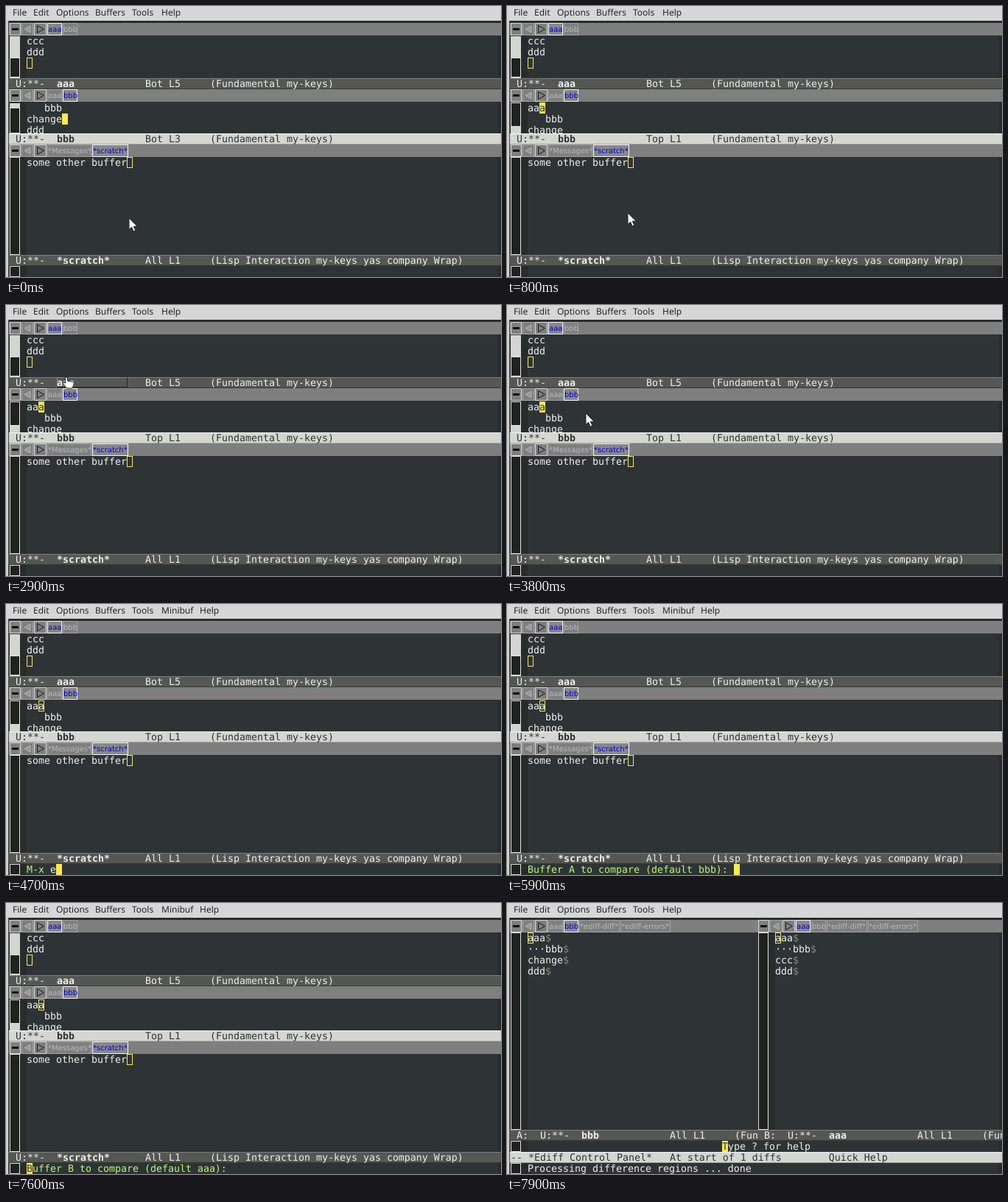
An HTML page that plays this animation: 672 by 368 pixels, repeating every 8000 ms.

```html
<!DOCTYPE html>
<html lang="en">
<head>
<meta charset="utf-8">
<title>Comparing two buffers</title>
<style>
html, body { margin: 0; width: 100%; height: 100%; overflow: hidden; background: #2e3436; }
svg { display: block; width: 672px; height: 368px; }
text { white-space: pre; text-rendering: geometricPrecision; }
.mono { font: 13.29px "DejaVu Sans Mono", monospace; }
.bold { font-weight: bold; }
.menu { font: 12px "Noto Sans", "Open Sans", sans-serif; }
.tab { font: 10px "DejaVu Sans", sans-serif; }
</style>
</head>
<body>
<svg id="stage" viewBox="0 0 672 368"></svg>
<script>
const LOOP = 8000;
const COL = 8, ROW = 15, LEFT = 28;
const BG = '#2e3436', FG = '#eeeeec', YELLOW = '#fce94f', GREEN = '#b4fa70';
const stage = document.getElementById('stage');

const esc = s => s.replace(/&/g, '&amp;').replace(/</g, '&lt;');
const rect = (x, y, w, h, fill, stroke) =>
  stroke
    ? `<rect x="${x + .5}" y="${y + .5}" width="${w - 1}" height="${h - 1}" fill="${fill}" stroke="${stroke}"/>`
    : `<rect x="${x}" y="${y}" width="${w}" height="${h}" fill="${fill}"/>`;
const label = (x, y, s, fill = FG, cls = 'mono') =>
  `<text x="${x}" y="${y}" fill="${fill}" class="${cls}">${esc(s)}</text>`;
const path = (d, fill, stroke = 'none') =>
  `<path d="${d}" fill="${fill}" stroke="${stroke}"/>`;

// Block or hollow text cursor over the given character
function cursor(x, y, filled, char = '') {
  if (!filled) return rect(x, y, COL, ROW, 'none', YELLOW);
  return rect(x, y, COL, ROW, YELLOW) + label(x, y + 12, char, BG);
}

function menuBar(extra) {
  const items = [['File', 9], ['Edit', 37], ['Options', 68], ['Buffers', 121], ['Tools', 171]];
  if (extra) items.push([extra, 211]);
  items.push(['Help', { Minibuf: 263, YASnippet: 279 }[extra] || 211]);
  return rect(0, 0, 672, 20, '#d6d6d6') + rect(0, 20, 672, 3, '#292d2e') +
    items.map(([s, x]) => label(x, 13, s, '#262626', 'menu')).join('');
}

const tabWidths = { aaa: 19, bbb: 19, '*Messages*': 59, '*scratch*': 48, '*ediff-diff*': 54, '*ediff-errors*': 67 };

function tabBar(x, y, names, active) {
  let out = rect(x, y, 672 - x, 17, '#7f7f7f');
  for (const [dx, w] of [[1, 15], [17, 16], [34, 17]])
    out += rect(x + dx, y, w, 17, '#7f7f7f', dx === 17 ? '#a2a2a2' : '#d8d8d8');
  out += rect(x + 4, y + 7, 9, 3, '#111');
  out += path(`M${x + 29} ${y + 4}v9l-8-4.5Z`, '#989898', '#b4b4b4');
  out += path(`M${x + 38.5} ${y + 3.5}v10l9-5Z`, 'none', '#161616');
  let tx = x + 52;
  for (const name of names) {
    const on = name === active, w = tabWidths[name];
    out += rect(tx, y, w + 1, 17, on ? '#888' : '#7f7f7f', on ? '#f4f4f4' : '#a0a0a0');
    out += label(tx + 1, y + 12, name, on ? '#0000e6' : '#b9b9b9', 'tab');
    tx += w + 2;
  }
  return out;
}

// Text area with fringes and scroll bar; the dark slider marks the visible part
function pane(x, y, h, from = 0, to = h) {
  return rect(x, y, 672 - x, h, BG) + rect(x, y, 24, h, '#272c2d') + rect(668, y, 4, h, '#272c2d') +
    rect(x + 1, y + 1, 14, h - 1, '#d3d5d0') +
    rect(x + 1, y + from, 14, to - from, '#20221e', '#e4e4e0');
}

const lines = (x, y, rows) => rows.map((s, i) => label(x, y + 12 + i * ROW, s)).join('');

function modeBase(x, y, active) {
  return rect(x, y, 672 - x, ROW, active ? '#d3d7cf' : '#555753') +
    rect(x, y, 672 - x, 1, active ? '#f0f2ed' : '#7d807a') +
    rect(x, y + 14, 672 - x, 1, active ? '#a5a8a1' : '#363835');
}

function modeLine(x, y, name, where, mode, active = false, prefix = '') {
  const ink = active ? BG : FG, head = prefix + 'U:**-  ';
  const nameX = x + 9 + head.length * COL;
  return modeBase(x, y, active) + label(x + 9, y + 12, head, ink) +
    label(nameX, y + 12, name, ink, 'mono bold') +
    label(nameX + 15 * COL, y + 12, where, ink) +
    label(nameX + 26 * COL - (prefix ? 0 : 0), y + 12, mode, ink);
}

const ease = p => p * p * (3 - 2 * p);
const track = [[0, 167, 288], [700, 167, 288], [1600, 75, 84], [1900, 75, 84], [2200, 74, 60],
  [2500, 74, 60], [2800, 82, 98], [3300, 82, 98], [3800, 107, 147], [4400, 107, 147]];

function pointerAt(t) {
  const i = track.findIndex(k => k[0] > t);
  if (i < 0) return null;
  const [a, b] = [track[i - 1], track[i]];
  const p = ease((t - a[0]) / (b[0] - a[0]));
  return { x: Math.round(a[1] + (b[1] - a[1]) * p), y: Math.round(a[2] + (b[2] - a[2]) * p) };
}

function drawPointer({ x, y }, hand) {
  const shape = hand
    ? 'M-1.5 0H1.5V5L9 6.5Q11 7 10 10L8 15H0L-4.5 8.5Q-4 6-1.5 8Z'
    : 'M0 0V15.5L3.6 12.2 6.2 18 8.8 16.8 6.3 11.2H11.2Z';
  return `<g transform="translate(${x} ${y})">${path(shape, '#fff', '#222')}</g>`;
}

function editorState(t) {
  if (t < 200) return { top: 1, line: 3, col: 6 };
  if (t < 400) return { top: 1, line: 2, col: 6 };
  if (t < 600) return { top: 0, line: 1, col: 3 };
  return { top: 0, line: 1, col: 2 };
}

function minibuffer(t) {
  if (t < 4500) return null;
  if (t < 5900) {
    const typed = 'ediff-buffers'.slice(0, Math.max(0, Math.floor((t - 4600) / 100)));
    return { prompt: 'M-x ', typed };
  }
  if (t < 6200) return { prompt: 'Buffer A to compare (default bbb): ', typed: '' };
  if (t < 6900) return { prompt: '', typed: 'Buffer is read-only: #<buffer *Completions*>', tall: true };
  return { prompt: `Buffer ${t < 7300 ? 'A' : 'B'} to compare (default ${t < 7300 ? 'bbb' : 'aaa'}):`, typed: '', home: true };
}

function editing(t) {
  const mini = minibuffer(t), ed = editorState(t), mouse = pointerAt(t);
  const hover = mouse && mouse.y >= 97 && mouse.y < 112 && mouse.x >= 69 && mouse.x < 165;
  const files = ['aaa', 'bbb'], keys = '(Fundamental my-keys)';
  const split = mini && mini.tall ? 278 : 338;
  const text = ['aaa', '   bbb', 'change', 'ddd'];
  let out = menuBar(mini ? (mini.tall ? 'YASnippet' : 'Minibuf') : '');

  out += tabBar(4, 23, files, 'aaa') + pane(4, 40, 58, 30, 57) + lines(LEFT, 40, ['ccc', 'ddd']) +
    cursor(LEFT, 70, false) + modeLine(4, 98, 'aaa', 'Bot L5', keys);
  if (hover) {
    out += rect(69, 98, 96, 14, '#555753') + path('M69.5 111V98.5H164', 'none', '#8a8c87') +
      path('M70 111.5H164.5V99', 'none', '#252724') + label(69, 110, 'aaa', FG, 'mono bold');
  }

  const cx = LEFT + ed.col * COL, cy = 131 + (ed.line - 1 - ed.top) * ROW;
  out += tabBar(4, 113, files, 'bbb') + (ed.top ? pane(4, 131, 42, 7, 42) : pane(4, 131, 42, 0, 33)) +
    lines(LEFT, 131, text.slice(ed.top, ed.top + 3)) +
    cursor(cx, cy, !mini, text[ed.line - 1][ed.col] || '') +
    modeLine(4, 173, 'bbb', `${ed.top ? 'Bot' : 'Top'} L${ed.line}`, keys, true);

  out += tabBar(4, 188, ['*Messages*', '*scratch*'], '*scratch*') + pane(4, 205, split - 205) +
    lines(LEFT, 205, ['some other buffer']) + cursor(164, 205, false) +
    modeLine(4, split, '*scratch*', 'All L1', '(Lisp Interaction my-keys yas company Wrap)');

  const my = split + ROW;
  out += pane(4, my, 368 - my);
  if (mini) {
    const typedX = LEFT + mini.prompt.length * COL;
    out += label(LEFT, my + 12, mini.prompt, GREEN) + label(typedX, my + 12, mini.typed);
    out += mini.home ? cursor(LEFT, my, true, 'B') : cursor(typedX + mini.typed.length * COL, my, true);
  }
  return out + (mouse ? drawPointer(mouse, hover) : '');
}

function diffPane(x, name, prefix, third) {
  const rows = ['aaa', '···bbb', third, 'ddd'], tx = x + 24;
  return tabBar(x, 23, ['aaa', 'bbb', '*ediff-diff*', '*ediff-errors*'], name) +
    pane(x, 40, 268) + lines(tx, 40, rows) +
    rows.map((s, i) => label(tx + s.length * COL, 52 + i * ROW, '$', '#888a85')).join('') +
    cursor(tx, 40, false) + modeLine(x, 308, name, 'All L1', '(Fundamental my-keys)', false, prefix);
}

function comparing() {
  return menuBar('') + diffPane(4, 'bbb', 'A:  ', 'change') + diffPane(340, 'aaa', 'B:  ', 'ccc') +
    pane(4, 323, ROW) + label(292, 335, 'Type ? for help') + cursor(292, 323, true, 'T') +
    modeBase(4, 338, true) +
    label(5, 350, '-- *Ediff Control Panel*   At start of 1 diffs        Quick Help', BG) +
    pane(4, 353, ROW) + label(LEFT, 365, 'Processing difference regions ... done');
}

let shown = '';
function render(t) {
  const picture = rect(0, 0, 672, 368, BG) + (t < 7800 ? editing(t) : comparing()) +
    rect(0, 20, 3, 348, '#cfcfcf') + rect(3, 20, 1, 348, '#4a4d4c');
  if (picture !== shown) stage.innerHTML = shown = picture;
}

const start = performance.now();
function tick() {
  render((performance.now() - start) % LOOP);
  requestAnimationFrame(tick);
}
tick();
</script>
</body>
</html>
```
